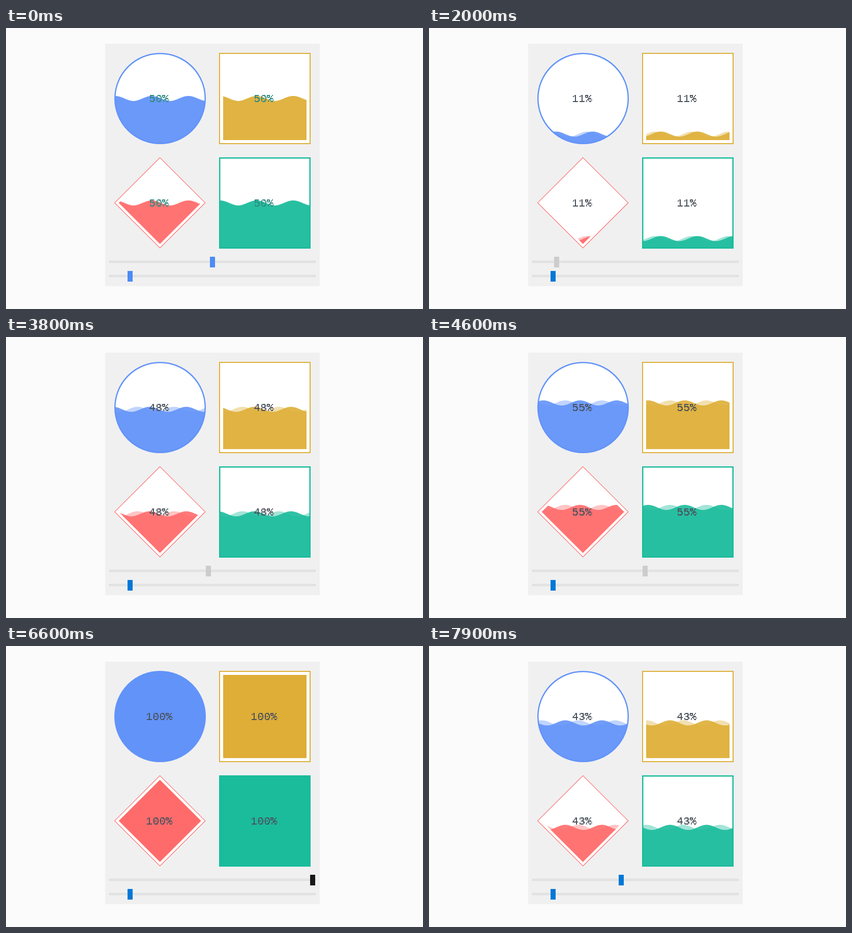
These frames come from a looping animation (820x554 px, 8000 ms). An HTML page with a canvas:

```html
<!DOCTYPE html>
<html lang="en">
<head>
<meta charset="utf-8">
<title>Wave progress</title>
<style>
  html, body { margin: 0; width: 100%; height: 100%; overflow: hidden; background: #fbfbfb; }
  canvas { display: block; }
</style>
</head>
<body>
<canvas id="stage" width="820" height="554"></canvas>
<script>
const ctx = document.getElementById('stage').getContext('2d');
const LOOP = 8000, TICK = 100;
const SIZE = 180, WAVELENGTH = 72, AMPLITUDE = 5;

// [time in s, percent], joined linearly
const levels = [
  [0, 50], [1, 50], [1.3, 42], [1.7, 18], [2, 11], [2.4, 4], [2.7, 0],
  [2.9, 5], [3.3, 28], [3.6, 45], [3.8, 48], [4.4, 55], [5.4, 55],
  [5.5, 62], [5.9, 100], [6.8, 100], [7.1, 78], [7.5, 46], [7.6, 43], [8, 43]
];
// [time in s, thumb colour], held until the next
const thumbs = [
  [0, '#4b8bf4'], [0.1, '#0078d7'], [0.6, '#171717'], [0.9, '#cccccc'],
  [6.1, '#0078d7'], [6.6, '#171717'], [6.8, '#cccccc'], [7.8, '#171717'], [7.9, '#0078d7']
];
const FULL_FROM = 5.9, FULL_TO = 6.8;

function lerpTable(table, t) {
  const i = Math.max(1, table.findIndex(k => k[0] >= t));
  const [t0, a] = table[i - 1], [t1, b] = table[i];
  return a + (b - a) * (t - t0) / (t1 - t0);
}
const held = (table, t) => table.filter(k => k[0] <= t + 1e-6).pop()[1];

function box(x, y, w, h) {
  const p = new Path2D();
  p.rect(x, y, w, h);
  return p;
}
function disc(x, y, r) {
  const p = new Path2D();
  p.arc(x, y, r, 0, Math.PI * 2);
  return p;
}
function diamond(x, y, r) {
  const p = new Path2D();
  p.moveTo(x, y - r);
  p.lineTo(x + r, y);
  p.lineTo(x, y + r);
  p.lineTo(x - r, y);
  p.closePath();
  return p;
}

const gauges = [
  { x: 213, y: 49, color: '#6293f9', line: 2.5, edge: disc(303, 139, 88.75), area: disc(303, 139, 88.75) },
  { x: 419, y: 49, color: '#deae37', line: 2, edge: box(420, 50, 178, 178), area: box(427, 57, 164, 164) },
  { x: 213, y: 255, color: '#ff6b6b', line: 1.2, edge: diamond(302.7, 344.7, 89), area: diamond(302.7, 344.7, 81) },
  { x: 419, y: 255, color: '#1abc9c', line: 2.5, edge: box(420.25, 256.25, 177.5, 177.5), area: box(420.25, 256.25, 177.5, 177.5) }
];

function fillWave(g, level, crest, alpha) {
  const mid = g.y + SIZE * (1 - level / 100);
  ctx.beginPath();
  ctx.moveTo(g.x, g.y + SIZE);
  for (let x = 0; x <= SIZE; x += 2) {
    ctx.lineTo(g.x + x, mid - AMPLITUDE * Math.cos(2 * Math.PI * (x - crest) / WAVELENGTH));
  }
  ctx.lineTo(g.x + SIZE, g.y + SIZE);
  ctx.closePath();
  ctx.globalAlpha = alpha;
  ctx.fill();
  ctx.globalAlpha = 1;
}

// Coarse glyphs: small text with hardened edges, shown at double size
const glyphs = new Map();
function glyph(ch, color) {
  const key = ch + color;
  if (!glyphs.has(key)) {
    const cell = document.createElement('canvas');
    cell.width = 8;
    cell.height = 12;
    const c = cell.getContext('2d');
    c.font = '10.8px "Liberation Mono", monospace';
    c.fillStyle = color;
    c.fillText(ch, 0, 9);
    const img = c.getImageData(0, 0, 8, 12);
    for (let i = 3; i < img.data.length; i += 4) {
      img.data[i] = (img.data[i] - 60) * 2.6;
    }
    c.putImageData(img, 0, 0);
    glyphs.set(key, cell);
  }
  return glyphs.get(key);
}
function drawLabel(text, g, color) {
  const left = Math.round(g.x + 87.5 - 6.5 * text.length);
  ctx.imageSmoothingEnabled = false;
  [...text].forEach((ch, i) => ctx.drawImage(glyph(ch, color), left + i * 13, g.y + 79, 16, 24));
}

function drawGauge(g, level, front, back, ink) {
  ctx.fillStyle = '#fff';
  ctx.fill(g.edge);
  ctx.fillStyle = g.color;
  if (level >= 100) {
    ctx.fill(g.area);
  } else {
    ctx.save();
    ctx.clip(g.area);
    fillWave(g, level, back, 0.4);
    fillWave(g, level, front, 0.9);
    ctx.restore();
  }
  ctx.strokeStyle = g.color;
  ctx.lineWidth = g.line;
  ctx.stroke(g.edge);
  drawLabel(Math.round(level) + '%', g, ink);
}

function drawSlider(y, value, color) {
  ctx.fillStyle = '#e7eaea';
  ctx.fillRect(203, y, 406, 4);
  ctx.strokeStyle = '#d6d6d6';
  ctx.lineWidth = 1;
  ctx.strokeRect(203.5, y + 0.5, 405, 3);
  ctx.fillStyle = color;
  ctx.fillRect(Math.round(203 + 3.95 * value), y - 8, 10, 21);
}

function draw(t) {
  const level = Math.round(lerpTable(levels, t));
  // Waves rest while the gauges are full
  const run = t - Math.max(0, Math.min(t, FULL_TO) - FULL_FROM);
  const front = 1 + 18 * run, back = 4 + 11 * run;
  const first = t < 0.1;

  ctx.fillStyle = '#fbfbfb';
  ctx.fillRect(0, 0, 820, 554);
  ctx.fillStyle = '#f0f0f0';
  ctx.fillRect(195, 31, 422, 478);
  gauges.forEach(g => drawGauge(g, level, front, back, first ? '#2e8b80' : '#4b525c'));
  drawSlider(459, level, held(thumbs, t));
  drawSlider(487, 9, first ? '#4b8bf4' : '#0078d7');
}

const start = performance.now();
function loop() {
  const ms = (performance.now() - start) % LOOP;
  draw(Math.floor(ms / TICK) * TICK / 1000);
  requestAnimationFrame(loop);
}
loop();
</script>
</body>
</html>
```
